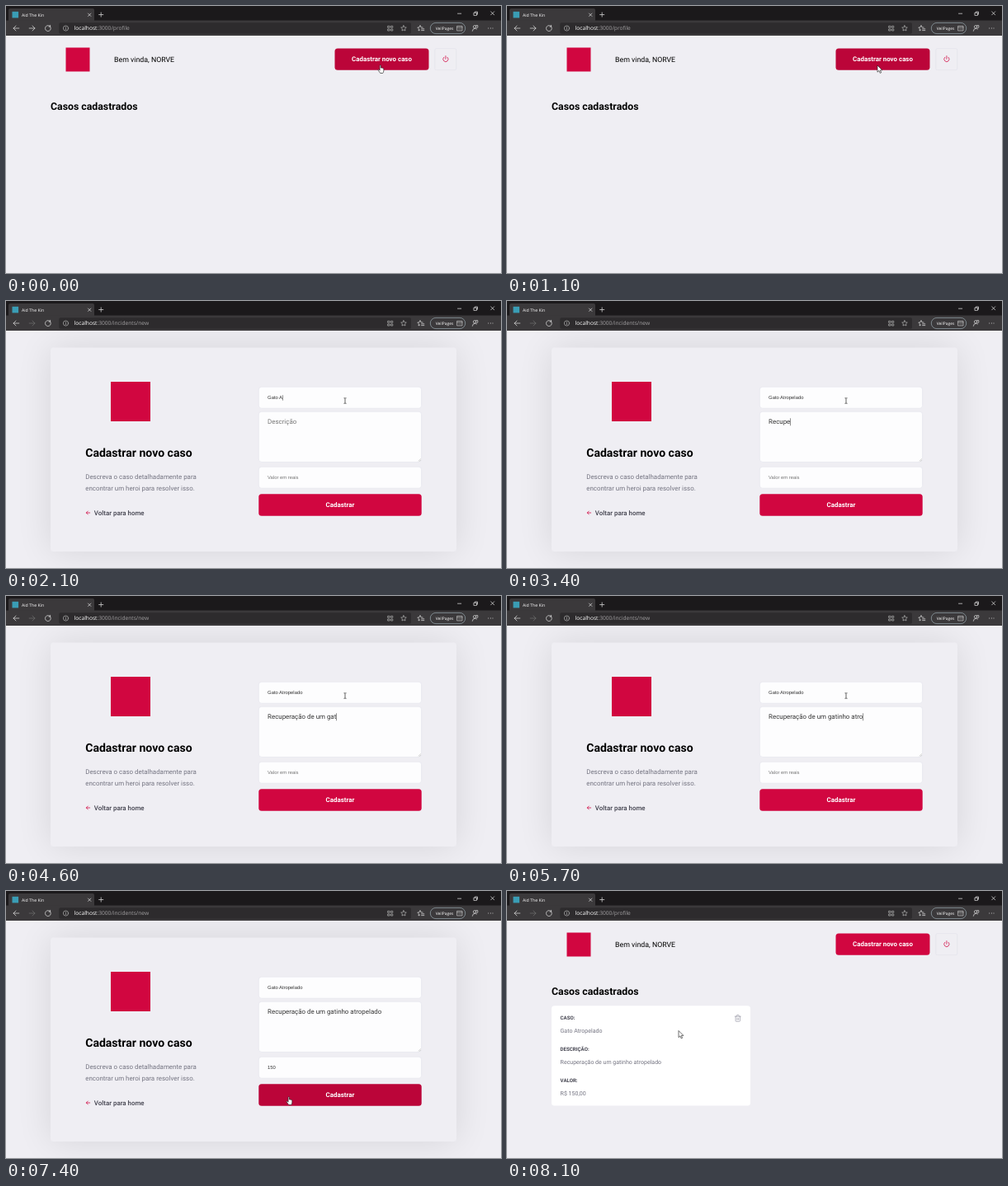
An HTML page that plays this animation: 600 px wide and 324 px high, repeating every 8.7 s.

```html
<!DOCTYPE html>
<html lang="pt-BR">
<head>
<meta charset="utf-8">
<title>Cadastro de casos</title>
<style>
html, body { margin: 0; width: 100%; height: 100%; overflow: hidden; background: #efeef3; }
svg { display: block; width: 100%; height: 100%; }
text { white-space: pre; font-family: Roboto, sans-serif; text-rendering: geometricPrecision; }
.browser text { font-family: "Open Sans", "Noto Sans", sans-serif; fill: #fff; }
.icon { fill: none; stroke: #d8d8d8; stroke-width: .75; stroke-linecap: round; stroke-linejoin: round; }
.icon.dim { stroke: #6d6b6d; }
.crimson { stroke: #d10640; }
.button { fill: #d10640; }
.button.hover { fill: #bb0539; }
.bold { font-weight: 700; }
.label { font-weight: 700; font-size: 6.15px; fill: #41414d; }
.value { font-size: 7.03px; fill: #737380; }
.body { font-size: 7.91px; fill: #737380; }
.action { font-weight: 700; font-size: 7.91px; fill: #fff; text-anchor: middle; }
.field { fill: #fdfdfe; stroke: #dcdce6; stroke-width: .5; }
.small { font-family: "Liberation Sans", Arial, sans-serif; font-size: 5.86px; }
.large { font-size: 7.91px; }
.cursor { fill: #fff; stroke: #111; stroke-width: .6; stroke-linejoin: round; }
</style>
</head>
<body>
<svg viewBox="0 0 600 324">
  <rect width="600" height="324" fill="#efeef3"/>

  <g id="profile">
    <rect x="72.5" y="50.5" width="29" height="29" fill="#d10640"/>
    <text x="131" y="68" font-size="8.79">Bem vinda, NORVE</text>
    <rect id="newCase" class="button" x="398.5" y="51.4" width="114" height="26.4" rx="3.5"/>
    <text class="action" x="455.5" y="67.3">Cadastrar novo caso</text>
    <rect x="519.8" y="51.7" width="26" height="26" rx="1.8" fill="none" stroke="#dcdce6" stroke-width=".5"/>
    <path class="icon crimson" d="M530.8 62.2a3.1 3.1 0 1 0 4.2 0M532.9 60.6v3.7"/>
    <text class="bold" x="54" y="126.2" font-size="12.3">Casos cadastrados</text>
    <g id="card">
      <rect x="54" y="139.2" width="241" height="121.3" rx="3.5" fill="#fff"/>
      <text class="label" x="64.6" y="156.2">CASO:</text>
      <text class="value" x="64.6" y="172">Gato Atropelado</text>
      <text class="label" x="64.6" y="193.7">DESCRIÇÃO:</text>
      <text class="value" x="64.6" y="209.7">Recuperação de um gatinho atropelado</text>
      <text class="label" x="64.6" y="231.7">VALOR:</text>
      <text class="value" x="64.6" y="247.5">R$ 150,00</text>
      <path class="icon" style="stroke:#a0a0ad" d="M276.3 152.2h7M277.1 152.2v5.3q0 .8 .8 .8h3.8q.8 0 .8-.8v-5.3M278.4 152v-.9q0-.6 .6-.6h1.6q.6 0 .6 .6v.9M279 154.2v2.2M280.6 154.2v2.2"/>
    </g>
  </g>

  <g id="form">
    <rect x="54" y="56.4" width="492" height="247.5" rx="3.5" opacity=".1" style="filter:blur(22px)"/>
    <rect x="54" y="56.4" width="492" height="247.5" rx="3.5" fill="#efeef3"/>
    <rect x="127" y="98" width="48" height="48" fill="#d10640"/>
    <text class="bold" x="96.2" y="189" font-size="14.06">Cadastrar novo caso</text>
    <text class="body" x="96.2" y="216.2">Descreva o caso detalhadamente para</text>
    <text class="body" x="96.2" y="230.2">encontrar um heroi para resolver isso.</text>
    <path class="icon crimson" d="M101.7 257h-4.4m2-2l-2 2 2 2"/>
    <text x="106.8" y="259.8" font-size="7.91" font-weight="500" fill="#41414d">Voltar para home</text>
    <rect class="field" x="306.3" y="104.2" width="197.3" height="26" rx="3.5"/>
    <rect class="field" x="306.3" y="134.2" width="197.3" height="61.2" rx="3.5"/>
    <rect class="field" x="306.3" y="201.2" width="197.3" height="26" rx="3.5"/>
    <path class="icon" style="stroke:#888;stroke-width:.4" d="M500 194.3l2.6-2.6M501.6 194.4l1-1"/>
    <text id="titleText" class="small" x="317.1" y="119.2"/>
    <text id="storyText" class="large" x="317.1" y="149.2"/>
    <text id="priceText" class="small" x="317.1" y="216.2"/>
    <rect id="caret" width=".5" fill="#222"/>
    <rect id="submit" class="button" x="306.3" y="234.3" width="197.4" height="26.4" rx="3.5"/>
    <text class="action" x="405" y="250.3">Cadastrar</text>
  </g>

  <g class="browser">
    <rect width="600" height="36" fill="#1b191b"/>
    <path d="M3 18V5q0-2 2-2h100q2 0 2 2v13z" fill="#3b393b"/>
    <rect y="17.5" width="600" height="18.5" fill="#3b393b"/>
    <rect x="64.3" y="20.3" width="426.7" height="13.4" rx="1.8" fill="#2d2b2d"/>
    <rect x="7.5" y="6.8" width="7.6" height="7.6" fill="#3a9db5"/>
    <text x="19" y="12.7" font-size="5.2">Aid The Kin</text>
    <path class="icon" d="M99.5 9l3.4 3.4m0-3.4l-3.4 3.4M112.6 10.5h5.2m-2.6-2.6v5.2"/>
    <path class="icon" d="M547.5 9.2h4.2M567.3 8.2h3.2v3.2h-3.2zM568.3 8v-1h3.2v3.2h-.8M587.7 6.8l4 4m0-4l-4 4"/>
    <path class="icon" d="M15.8 27H9m3-3l-3 3 3 3M53.6 25a3.4 3.4 0 1 1-2.6-1.3q1.5 0 2.6 1.3v-1.7m0 1.7h-1.7"/>
    <path id="forward" class="icon" d="M28.2 27H35m-3-3l3 3-3 3"/>
    <g class="icon" style="stroke:#aaa">
      <circle cx="72.5" cy="27" r="3.1"/>
      <path d="M72.5 26.8v1.7M72.5 25.4v.1"/>
      <path d="M463 24.3h2v2h-2zM463 28h2v2h-2zM466.8 28h2v2h-2zM466.8 24.3h2v2h-2z"/>
      <path d="M482 23.7l1 2.1 2.3.3-1.7 1.6.4 2.3-2-1.1-2 1.1.4-2.3-1.7-1.6 2.3-.3z"/>
    </g>
    <path class="icon" d="M502 23.8l1 2 2.1.3M502 23.8l-1 2-2.2.3 1.6 1.6-.4 2.3 1.7-1M503.6 27.8h3.2M503.6 29.6h3.2"/>
    <text x="82.6" y="29.4" font-size="6.65">localhost<tspan id="path" fill="#a3a1a3"/></text>
    <rect x="514.3" y="20.4" width="42.4" height="13.2" rx="6.6" fill="#3b393b" stroke="#a9bcc5" stroke-width=".6"/>
    <text x="520.8" y="28.9" font-size="4.9">VeilPages</text>
    <path class="icon" style="stroke-width:.6" d="M547 24.3h6v5.6h-6zM547 26h6M549 28h.2M551 28h.2"/>
    <path class="icon" d="M565.3 30.3q.3-3 3-3 1.3 0 2 .7M569.8 25.3a1.7 1.7 0 1 1-3.4 0 1.7 1.7 0 0 1 3.4 0M569.6 23.6h2.2v2.4l-1.3 1"/>
    <path class="icon" style="stroke-width:1" d="M584.8 27h.01M587.4 27h.01M590 27h.01"/>
  </g>

  <g id="pointer">
    <path id="arrow" class="cursor" d="M0 0v8.2l1.9-1.8 1.3 3 1.4-.6-1.3-2.9h2.6z"/>
    <path id="hand" class="cursor" d="M-.9 6.2V.5q0-.8 .7-.8t.7 .8v2.6q.7-.4 1.2 .1 .7-.3 1.1 .3 1-.1 1 .9v2.1q0 2-1.1 3h-3q-.9-1.4-2.4-3.3-.5-.8 .2-1.1 .7-.2 1.6 1.1z"/>
    <path id="beam" fill="none" stroke="#222" stroke-width=".7" d="M-1.5-3.2h1.1l.4.4.4-.4h1.1M0-2.8v5.8M-1.5 3.3h1.1l.4-.4.4.4h1.1"/>
  </g>
</svg>
<script>
const LOOP = 8700, STEP = 100;
const FORM_OPEN = 1200, SUBMIT_HOVER = 7200, FORM_SENT = 7600;
const $ = id => document.getElementById(id);
const show = (id, visible) => { $(id).style.display = visible ? "" : "none"; };

// Each field: focus time, and [time, characters typed] keys.
const fields = [
  { id: "titleText", hint: "Título do caso", text: "Gato Atropelado", focus: 1500, caretHeight: 6.4,
    keys: [[1600, 0], [2100, 6], [2800, 15]] },
  { id: "storyText", hint: "Descrição", text: "Recuperação de um gatinho atropelado", focus: 2900, caretHeight: 9,
    keys: [[2800, 0], [3400, 6], [3600, 9], [4500, 21], [5400, 26], [5700, 30], [6300, 36]] },
  { id: "priceText", hint: "Valor em reais", text: "150", focus: 6400, caretHeight: 6.4,
    keys: [[6400, 0], [6700, 3]] }
];

const pointerKeys = [
  [0, 454, 72], [1000, 454, 72], [1100, 449, 72], [1200, 449, 72], [1500, 411, 121],
  [6800, 411, 121], [7200, 343, 250], [7500, 343, 250], [7700, 268, 206], [8100, 208, 169.5]
];

function sample(keys, t, column = 1) {
  if (t <= keys[0][0]) return keys[0][column];
  const next = keys.findIndex(key => key[0] > t);
  if (next < 0) return keys[keys.length - 1][column];
  const a = keys[next - 1], b = keys[next];
  return a[column] + (b[column] - a[column]) * (t - a[0]) / (b[0] - a[0]);
}

function drawFields(t) {
  const active = fields.filter(field => t >= field.focus).pop();
  for (const field of fields) {
    const count = Math.floor(sample(field.keys, t) + 1e-6);
    const node = $(field.id);
    node.textContent = count ? field.text.slice(0, count) : field.hint;
    node.style.fill = count ? "#333" : "#757575";
    if (field !== active) continue;
    const width = count ? node.getComputedTextLength() : 0;
    const caret = $("caret");
    caret.setAttribute("x", +node.getAttribute("x") + width + .2);
    caret.setAttribute("y", node.getAttribute("y") - field.caretHeight * .77);
    caret.setAttribute("height", field.caretHeight);
  }
  show("caret", active && t < SUBMIT_HOVER);
}

function drawPointer(t) {
  const x = sample(pointerKeys, t, 1), y = sample(pointerKeys, t, 2);
  $("pointer").setAttribute("transform", `translate(${x} ${y})`);
  const kind = t < 1100 ? "hand" : t < 1400 ? "arrow" : t < SUBMIT_HOVER ? "beam" : t < FORM_SENT ? "hand" : "arrow";
  for (const id of ["arrow", "hand", "beam"]) show(id, id === kind);
}

function draw(now) {
  const t = Math.floor(now % LOOP / STEP) * STEP;
  const onForm = t >= FORM_OPEN && t < FORM_SENT;
  show("form", onForm);
  show("profile", !onForm);
  show("card", t >= FORM_SENT);
  $("path").textContent = onForm ? ":3000/incidents/new" : ":3000/profile";
  $("forward").classList.toggle("dim", t >= FORM_OPEN);
  $("newCase").classList.toggle("hover", t < FORM_OPEN);
  $("submit").classList.toggle("hover", t >= SUBMIT_HOVER);
  if (onForm) drawFields(t);
  drawPointer(t);
}

const start = performance.now();
function tick() {
  draw(performance.now() - start);
  requestAnimationFrame(tick);
}
tick();
</script>
</body>
</html>
```
